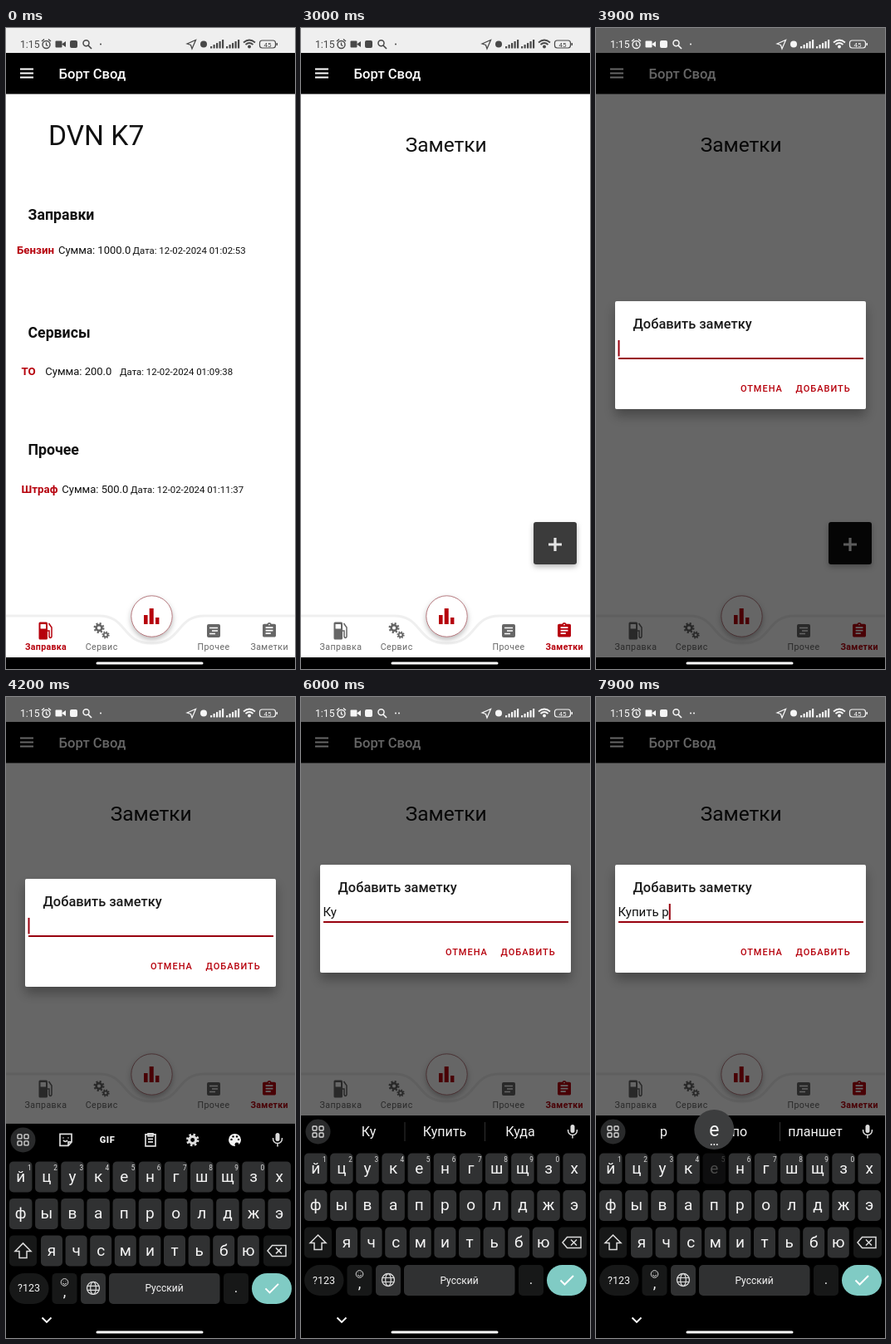
Animation of 348x772 px, one loop 8000 ms. Source, as an HTML page:

```html
<!DOCTYPE html>
<html lang="ru">
<head>
<meta charset="utf-8">
<style>
html, body { margin: 0; width: 100%; height: 100%; overflow: hidden; background: #fff; }
svg { display: block; width: 100vw; height: 100vh; font-family: Roboto, "Noto Sans", sans-serif; }
text { white-space: pre; }
.mid { text-anchor: middle; }
.line { fill: none; stroke: currentColor; }
</style>
</head>
<body>
<svg id="stage" viewBox="0 0 348 772"></svg>
<script>
const LOOP = 8000, RED = '#b6000c', INPUT_RED = '#98000e', GREY = '#666';
const clamp = x => Math.max(0, Math.min(1, x));
const ramp = (t, from, to) => clamp((t - from) / (to - from));
const $ = id => document.getElementById(id);

const text = (x, y, size, str, attrs = '') =>
  `<text x="${x}" y="${y}" font-size="${size}" ${attrs}>${str}</text>`;
const rect = (x, y, w, h, fill, r = 0, attrs = '') =>
  `<rect x="${x}" y="${y}" width="${w}" height="${h}" rx="${r}" fill="${fill}" ${attrs}/>`;
const circle = (x, y, r, attrs = '') => `<circle cx="${x}" cy="${y}" r="${r}" ${attrs}/>`;
const line = (d, w = 1.5, attrs = '') => `<path class="line" d="${d}" stroke-width="${w}" ${attrs}/>`;
const group = (id, body, attrs = '') => `<g id="${id}" ${attrs}>${body}</g>`;

function gear(x, y, r, teeth) {
  const step = 2 * Math.PI * r / teeth / 2;
  return circle(x, y, r, `class="line" stroke-width="${r * .5}" stroke-dasharray="${step}"`) +
    circle(x, y, r * .65, `class="line" stroke-width="${r * .5}"`);
}

// ---- status bar
function signal(x) {
  return [0, 1, 2, 3, 4].map(i =>
    rect(x + i * 3.5, 22 - i * 2, 2.2, 2.5 + i * 2, 'currentColor', .5)).join('');
}
const statusIcons = group('status',
  text(17, 24, 12.2, '1:15') +
  circle(48.5, 20, 4.5, 'class="line" stroke-width="1.4"') +
  line('M48.5 17.5V20.5L50.5 21.5M43 16L46 13.5M54 16L51 13.5', 1.3) +
  rect(59.5, 15.5, 8, 8, 'currentColor', 1) + '<path d="M67 19.5L72 16V23Z"/>' +
  rect(77, 15, 9, 9, 'currentColor', 2) +
  circle(96.5, 18.3, 3.5, 'class="line" stroke-width="1.5"') + line('M99 21L103 25', 1.7) +
  circle(114, 19.5, 1) + group('dot2', circle(118, 19.5, 1)) +
  line('M218 19L228.5 14.5L224 25L222.5 20.5Z', 1.3) +
  circle(238, 19.5, 4) + signal(246) + signal(265) +
  line('M286 17.5Q293 11.5 300 17.5M288.5 20Q293 16 297.5 20', 1.7) + circle(293, 22.5, 2) +
  rect(305.5, 15, 19, 9, 'none', 3, 'class="line" stroke-width="1.2"') +
  rect(325.5, 18, 1.5, 3, 'currentColor') +
  text(315, 22.5, 8, '45', 'class="mid"'), 'fill="currentColor"');

// ---- pages
function record(y, kind, sum, date, xs) {
  return text(xs[0], y, 13.3, kind, `font-weight="700" fill="${RED}"`) +
    text(xs[1], y, 13, 'Сумма: ' + sum) + text(xs[2], y, 11.4, 'Дата: 12-02-2024 ' + date);
}
const heading = (y, str) => text(26.5, y, 17.7, str, 'font-weight="700"');
const overview = group('overview',
  text(51, 141, 33.6, 'DVN K7') +
  heading(231, 'Заправки') + record(272, 'Бензин', '1000.0', '01:02:53', [13, 63, 152.5]) +
  heading(373, 'Сервисы') + record(418, 'ТО', '200.0', '01:09:38', [18.5, 47.3, 137]) +
  heading(514, 'Прочее') + record(560, 'Штраф', '500.0', '01:11:37', [18.5, 67.3, 150]), 'fill="#111"');

const notes = group('notes',
  text(174.7, 149, 24.5, 'Заметки', 'class="mid" fill="#111"') +
  group('fab', rect(280, 595, 52, 51, '#111', 3, 'id="fabBox" filter="url(#lift)"') +
    line('M298 622H314M306 614V630', 3.2, 'color="#e4e4e4"')));

// ---- bottom tabs
const icons = {
  fuel: rect(39.5, 715.5, 10.5, 21, 'currentColor', 1.5) + rect(41.5, 718, 6.5, 5.5, '#fff', .5) +
    line('M50 726H52V733Q53.8 736 55 733V722L51.5 717', 1.5),
  gears: gear(112, 722.5, 5.2, 8) + gear(120, 731, 3.7, 8),
  other: rect(242, 718, 16, 16, 'currentColor', 2) +
    line('M245 722.5H255M248 726H255M245 729.5H252', 1.6, 'color="#fff"'),
  clip: '<path transform="translate(306.4 715) scale(.886)" d="M19 3h-4.18C14.4 1.84 13.3 1 12 1c-1.3 0-2.4.84-2.82 2H5c-1.1 0-2 .9-2 2v14c0 1.1.9 2 2 2h14c1.1 0 2-.9 2-2V5c0-1.1-.9-2-2-2zm-7 0c.55 0 1 .45 1 1s-.45 1-1 1-1-.45-1-1 .45-1 1-1zm2 14H7v-2h7v2zm3-4H7v-2h10v2zm0-4H7V7h10v2z"/>'
};
const tab = (id, x, icon, label) => group(id,
  icon + text(x, 748.5, 10.6, label, 'class="mid"'), 'fill="currentColor"');
const edge = 'M-6 708H112C147 708 138 741 175.5 741C213 741 204 708 239 708H354';
const tabs = group('tabs',
  `<path d="${edge}V758H-6Z" fill="#fff"/>` +
  line(edge, 3, 'color="#efefef"') +
  circle(317, 725, 0, `id="tabRipple" fill="${RED}" clip-path="url(#tabClip)"`) +
  circle(175.5, 708.5, 24.7, 'fill="#fff" stroke="#a45a60" stroke-width=".8" filter="url(#lift)"') +
  circle(175.5, 708.5, 0, `id="homeRipple" fill="${RED}"`) +
  rect(166, 707, 4.6, 11, RED) + rect(172.7, 699, 5, 19, RED) + rect(180, 710, 4.4, 8, RED) +
  tab('tabFuel', 48, icons.fuel, 'Заправка') + tab('tabService', 115.2, icons.gears, 'Сервис') +
  tab('tabOther', 250, icons.other, 'Прочее') + tab('tabNotes', 317.2, icons.clip, 'Заметки'));

// ---- dialog, laid out from its own top edge
const dialog = group('dialog',
  rect(23, 0, 302, 130, '#fff', 2, 'filter="url(#deep)"') +
  text(44.5, 33, 16.4, 'Добавить заметку', 'font-weight="500" fill="#1a1a1a"') +
  rect(27, 68.5, 295, 1, '#999') +
  `<path id="focusLine" stroke="${INPUT_RED}" stroke-width="2"/>` +
  text(26.5, 62, 15, '', 'id="typed" fill="#111"') +
  rect(0, 47, 2, 19.5, INPUT_RED, 0, 'id="caret"') +
  text(174, 109, 11, 'ОТМЕНА', `font-weight="500" letter-spacing="1" fill="${RED}"`) +
  text(240.5, 109, 11, 'ДОБАВИТЬ', `font-weight="500" letter-spacing="1" fill="${RED}"`));

// ---- keyboard
const BACK = '#000', KEY = '#303132', DARK_KEY = '#171818';
const keys = {};
const keycap = (x, y, w, fill, r = 5, attrs = '') => rect(x, y - 18.5, w, 37, fill, r, attrs);
function row(letters, x0, step, y, w, digits = false) {
  return [...letters].map((ch, i) => {
    const x = x0 + step * i;
    keys[ch] = { x, y, more: digits || ch === 'ь' };
    return group('key' + ch,
      keycap(x - w / 2, y, w, KEY) +
      text(x, y + 5.8, 19, ch, `class="mid" id="cap${ch}"`) +
      (digits && i < 10 ? text(x + 10.7, y - 8, 8.2, (i + 1) % 10, 'class="mid" fill="#ddd"') : ''));
  }).join('');
}
const mic = rect(324.5, 515, 5, 10, 'currentColor', 2.5) +
  line('M321.5 521Q321.5 527.5 327 527.5Q332.5 527.5 332.5 521M327 527V531.5', 1.5);
const tools = group('tools',
  line('M65 516.5H79V526L75 530.5H65ZM75 530V526H79M69 524Q71.5 527 74 524M69 520.5V521.5M75 520.5V521.5', 1.7) +
  text(122, 527, 11, 'GIF', 'class="mid" font-weight="900" letter-spacing=".6"') +
  line('M168 517H180V531H168ZM171 516H177V519H171ZM171 522.5H177M171 526H177', 1.7) +
  gear(224.7, 523.5, 6.2, 8) +
  circle(275.5, 523.5, 7.5) +
  [[271.5, 523], [273.5, 519.5], [278, 519.5], [280, 523]].map(p => circle(...p, 1.2, `fill="${BACK}"`)).join('') +
  circle(278, 529, 2.5, `fill="${BACK}"`));
const hints = group('hints',
  [81.5, 173, 264].map((x, i) => text(x, 529, 16, '', `class="mid" id="hint${i}"`)).join('') +
  line('M125 512V535M221.5 512V535', 1, 'color="#303030"'));
const keyboard = group('keyboard',
  rect(0, 504, 348, 268, BACK) +
  circle(20.5, 523.5, 15, 'fill="#292a2b"') +
  [0, 1, 2, 3].map(i => rect(14 + i % 2 * 8, 517 + (i >> 1) * 8, 5, 5, 'none', 1, 'class="line" stroke-width="1.3"')).join('') +
  tools + hints + mic +
  row('йцукенгшщзх', 17.7, 31.15, 568, 27.5, true) +
  row('фывапролджэ', 17.7, 31.15, 612.5, 27.5) +
  row('ячсмитьбю', 55, 29.6, 657, 26) +
  keycap(4, 657, 33, DARK_KEY) +
  '<path id="shift" stroke="currentColor" stroke-width="1.5" d="M20.5 648L30 657.5H25V665.5H16V657.5H11Z"/>' +
  keycap(310, 657, 34, DARK_KEY) +
  line('M315 657L320.5 650.5H337V663.5H320.5ZM325 653.5L332 660.5M332 653.5L325 660.5') +
  keycap(4, 702.5, 47.5, DARK_KEY, 18.5) + text(27.5, 706.5, 12.5, '?123', 'class="mid"') +
  keycap(55.5, 702.5, 30, DARK_KEY) + text(70.5, 712, 18, ',', 'class="mid"') +
  circle(70.5, 695, 4.3, 'class="line" stroke-width="1"') + line('M68 696Q70.5 699 73 696M69 693.5V694M72 693.5V694', 1) +
  keycap(90, 702.5, 30, KEY) +
  circle(105, 702, 7.5, 'class="line" stroke-width="1.3"') +
  '<ellipse class="line" cx="105" cy="702" rx="3.3" ry="7.5" stroke-width="1.2"/>' +
  line('M98 699.5H112M98 704.5H112', 1.2) +
  keycap(124, 702.5, 133.5, KEY, 5, 'id="space"') + text(190.5, 706.5, 12, 'Русский', 'class="mid"') +
  keycap(262, 702.5, 30, DARK_KEY) + text(277, 707, 17, '.', 'class="mid"') +
  keycap(296, 702.5, 48, '#80cbc4', 18.5) + line('M312.5 702.5L317.5 707.5L328 697', 2, 'color="#fff"') +
  group('popup', circle(0, 0, 24, 'fill="#3c3d3e"') +
    text(0, 7.5, 23, '', 'class="mid" id="popupChar"') +
    group('popupMore', [-3.5, 0, 3.5].map(x => circle(x, 18, 1)).join(''))),
  'fill="#f4f4f4" color="#dcdcdc"');

$('stage').innerHTML = `<defs>
  <filter id="lift" x="-30%" y="-30%" width="160%" height="170%"><feDropShadow dx="0" dy="3" stdDeviation="3" flood-opacity=".28"/></filter>
  <filter id="deep" x="-20%" y="-30%" width="140%" height="180%"><feDropShadow dx="0" dy="8" stdDeviation="7" flood-opacity=".3"/></filter>
  <clipPath id="tabClip"><rect y="690" width="348" height="68"/></clipPath></defs>` +
  rect(0, 0, 348, 772, '#fff') + rect(0, 0, 348, 30, '#efefef') +
  overview + notes + rect(0, 30, 348, 49.5, '#000') +
  line('M17 49.5H33M17 54.5H33M17 59.5H33', 1.8, 'color="#fff"') +
  text(63.5, 61, 16.6, 'Борт Свод', 'fill="#fff" font-weight="500"') +
  tabs + rect(0, 758, 348, 14, '#000') +
  rect(0, 0, 348, 772, '#000', 0, 'id="shade"') + statusIcons + dialog + keyboard +
  line('M43.5 747.5L49 753L54.5 747.5', 1.8, 'id="chevron" color="#fff"') +
  rect(108.5, 763.5, 129, 3, '#fff', 1.5);

// ---- script of the scene
const presses = [
  ['К', 4900, 5200], ['у', 5400, 5500], ['п', 6100, 6300], ['и', 6500, 6600], ['т', 6600, 6700],
  ['ь', 6700, 6800], [' ', 6900, 7000], ['р', 7700, 7800], ['е', 7900, 8000]
];
const hintSets = [
  [], ['К', 'Как', 'Кстати'], ['Ку', 'Купить', 'Куда'], ['Куп', 'Купить', 'Купил'],
  ['Купи', 'Купить', 'Купил'], ['Купит', 'Купить', 'Купил'], ['Купить', 'Курить', 'Купит'],
  ['и', 'в', 'машину'], ['р', 'по', 'планшет']
];
const show = (id, on) => $(id).setAttribute('display', on ? 'inline' : 'none');
const set = (id, attrs) => { for (const k in attrs) $(id).setAttribute(k, attrs[k]); };

function paintTab(id, active) {
  set(id, {
    color: active ? RED : GREY,
    'font-weight': active ? 700 : 400,
    'letter-spacing': active ? .3 : .45
  });
}

function ripple(id, t, from, to, radius, peak) {
  const p = ramp(t, from, to);
  set(id, { r: radius * Math.min(1, p * 2), opacity: t < from || p === 1 ? 0 : peak * (1 - p) });
}

function drawKeyboard(t, up) {
  const p = ramp(t, 4050, 4300);
  set('keyboard', { transform: `translate(0 ${268 * (1 - p) ** 3.6})` });
  ['keyboard', 'chevron'].forEach(id => show(id, up));
  const upper = t >= 4600 && t < 5200;
  const held = presses.find(([, down, release]) => t >= down && t < release);
  const heldKey = held && keys[held[0].toLowerCase()];
  for (const ch in keys) {
    $('cap' + ch).textContent = upper ? ch.toUpperCase() : ch;
    set('key' + ch, { opacity: heldKey === keys[ch] ? .3 : 1 });
  }
  set('shift', { fill: upper ? '#dcdcdc' : 'none' });
  set('space', { fill: held && !heldKey ? '#48494a' : KEY });
  show('popup', heldKey);
  if (heldKey) {
    set('popup', { transform: `translate(${heldKey.x} ${heldKey.y - 47})` });
    $('popupChar').textContent = held[0];
    show('popupMore', heldKey.more);
  }
}

function drawDialog(t) {
  const open = ramp(t, 3000, 3300);
  const top = 202 + 127 * (1 - ramp(t, 4050, 4300)) ** 2.2;
  const scale = .9 + .1 * open;
  show('dialog', open > 0);
  set('dialog', { opacity: open, transform: `translate(174 ${top + 65}) scale(${scale}) translate(-174 -65)` });
  set('shade', { opacity: .6 * open });
  set('status', { color: open > 0 ? '#f6f6f6' : '#484848' });

  const half = 147.5 * ramp(t, 3700, 3900);
  set('focusLine', { d: `M${174.5 - half} 69H${174.5 + half}` });
  const done = presses.filter(k => k[2] <= t);
  $('typed').textContent = done.map(k => k[0]).join('');
  const lastEdit = done.length ? done[done.length - 1][2] : 3800;
  show('caret', t >= 3800 && Math.floor((t - lastEdit) / 500) % 2 === 0);
  set('caret', { x: 26.5 + $('typed').getComputedTextLength() });

  show('tools', !done.length);
  show('hints', done.length);
  [0, 1, 2].forEach(i => { $('hint' + i).textContent = hintSets[done.length][i] || ''; });
}

function render(t) {
  const keyboardUp = t >= 4100, onNotes = t >= 1400;
  show('overview', !onNotes);
  show('notes', onNotes);
  show('fab', !keyboardUp);
  show('dot2', t >= 4500);
  const glow = 17 + Math.round(41 * ramp(t, 2700, 2900) * (1 - ramp(t, 3200, 3500)));
  set('fabBox', { fill: `rgb(${glow},${glow},${glow})` });
  set('tabs', { transform: `translate(0 ${keyboardUp ? -254 : 0})` });
  paintTab('tabFuel', t < 100);
  paintTab('tabService', false);
  paintTab('tabOther', false);
  paintTab('tabNotes', onNotes);
  ripple('homeRipple', t, 50, 400, 25, .15);
  ripple('tabRipple', t, 1350, 2100, 40, .14);
  drawDialog(t);
  drawKeyboard(t, keyboardUp);
}

// The picture advances ten times a second.
function tick() {
  render(Math.floor(performance.now() % LOOP / 100) * 100);
  requestAnimationFrame(tick);
}
tick();
</script>
</body>
</html>
```
